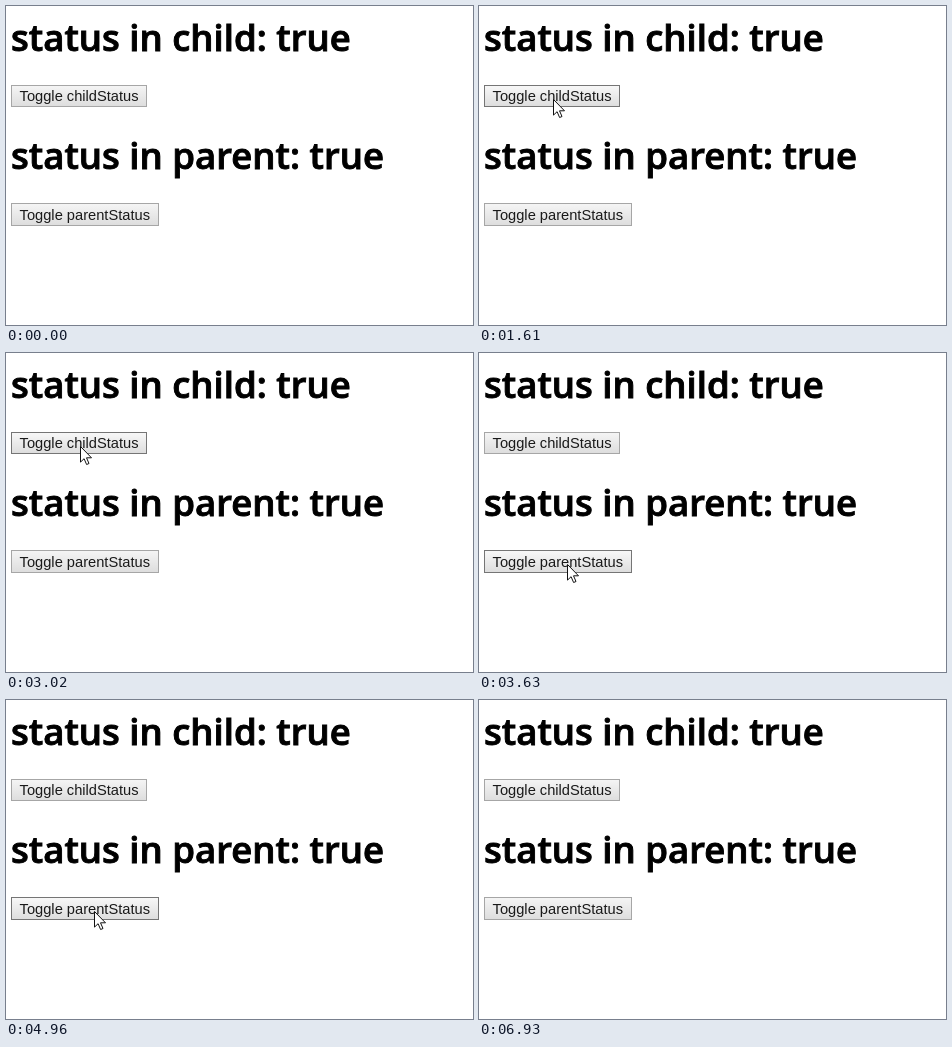
An HTML page for the animation above (7160 ms loop, 467 px wide and 319 px high).

```html
<!DOCTYPE html>
<html lang="en">
<head>
<meta charset="utf-8">
<title>Toggle status</title>
<style>
  html, body { margin: 0; width: 100%; height: 100%; overflow: hidden; background: #fff; }
  svg { display: block; }
  .title { font: 600 36.6px "Open Sans", "Noto Sans", sans-serif; stroke: #000; stroke-width: .9; }
  .label { font: 14.667px "Liberation Sans", Arial, sans-serif; fill: #1a1a1a; }
  .button rect { fill: url(#idle); stroke: #a6a6a6; }
  .button.hover rect { fill: url(#lit); stroke: #757575; }
  .button.pressed rect { fill: url(#down); stroke: #a0a0a0; }
</style>
</head>
<body>
<svg width="467" height="319" viewBox="0 0 467 319">
  <defs>
    <linearGradient id="idle" x2="0" y2="1"><stop stop-color="#f5f5f5"/><stop offset="1" stop-color="#dddddd"/></linearGradient>
    <linearGradient id="lit" x2="0" y2="1"><stop stop-color="#f8f8f8"/><stop offset="1" stop-color="#dddddd"/></linearGradient>
    <linearGradient id="down" x2="0" y2="1"><stop stop-color="#dcdcdc"/><stop offset="1" stop-color="#f5f5f5"/></linearGradient>
  </defs>
  <text class="title" x="5" y="44.6">status in child: <tspan class="value"></tspan></text>
  <g class="button" id="child">
    <rect x="5.5" y="79.5" width="135" height="21"/>
    <text class="label" x="13.6" y="95">Toggle childStatus</text>
  </g>
  <text class="title" x="5" y="162.6">status in parent: <tspan class="value"></tspan></text>
  <g class="button" id="parent">
    <rect x="5.5" y="197.5" width="147" height="22"/>
    <text class="label" x="13.6" y="214">Toggle parentStatus</text>
  </g>
  <path id="cursor" d="M.5.5v15.6l3.6-3.4 2.5 5.8 2.4-1-2.5-5.7h5z" fill="#fff" stroke="#111"/>
</svg>
<script>
const LOOP = 7160;
const ENTER = [326, 304], CHILD = [74, 93], PARENT = [88, 211], EXIT = [407, 304];
const toggles = [900, 1610, 2370, 3020, 4350, 4960, 5590, 6320];
const presses = [[840, 900], [1530, 1610], [2240, 2370], [2930, 3020], [4260, 4350], [5540, 5590], [6240, 6320]];
const values = document.querySelectorAll('.value');
const cursor = document.getElementById('cursor');
const buttons = [
  { el: document.getElementById('child'), right: 141, top: 79, bottom: 101 },
  { el: document.getElementById('parent'), right: 153, top: 197, bottom: 220 }
];

const mix = (a, b, p) => a.map((v, i) => Math.round(v + (b[i] - v) * p));
const clamp = p => Math.min(1, Math.max(0, p));
const smooth = p => p * p * (3 - 2 * p);
// Index of the current discrete screen update, 0 to count - 1.
const stepped = (t, from, to, count) => Math.floor(clamp((t - from) / (to - from)) * (count - 1) + 1e-6);

function pointerAt(t) {
  if (t < 70 || t >= 6930) return null;
  if (t < 3240) return mix(ENTER, CHILD, smooth(stepped(t, 70, 760, 10) / 9));
  if (t < 6470) return mix(CHILD, PARENT, smooth((stepped(t, 3240, 3630, 6) + 1) / 6));
  return mix(PARENT, EXIT, ((stepped(t, 6470, 6930, 7) + 1) / 6) ** 1.4);
}

function draw(t) {
  // The text in f5's pose is already "false" while the second press is held.
  const status = String(toggles.filter(at => t >= at).length % 2 === 0);
  values.forEach(v => { if (v.textContent !== status) v.textContent = status; });

  const point = pointerAt(t);
  const pressed = presses.some(([from, to]) => t >= from && t < to);
  cursor.style.display = point ? '' : 'none';
  if (point) cursor.setAttribute('transform', `translate(${point})`);
  for (const { el, right, top, bottom } of buttons) {
    const hover = !!point && point[0] >= 5 && point[0] < right && point[1] >= top && point[1] < bottom;
    el.classList.toggle('hover', hover);
    el.classList.toggle('pressed', hover && pressed);
  }
}

function tick() {
  draw(performance.now() % LOOP);
  requestAnimationFrame(tick);
}
tick();
</script>
</body>
</html>
```
